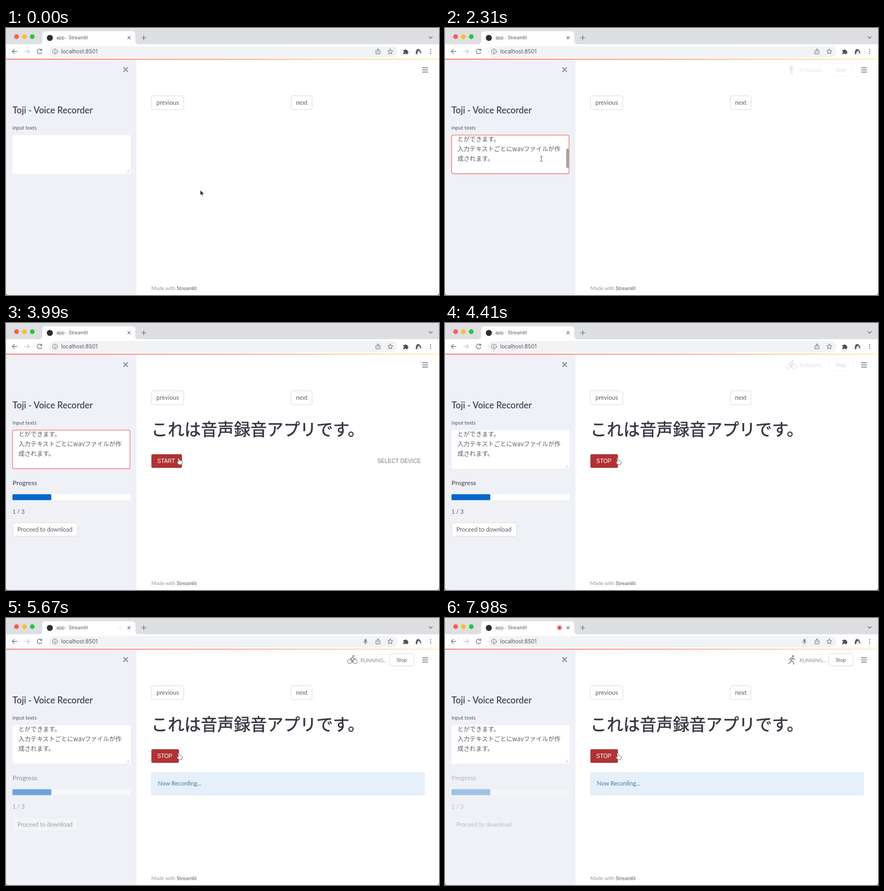
These frames come from a looping animation (800x494 px, 8000 ms). An HTML page:

```html
<!DOCTYPE html>
<html lang="ja">
<head>
<meta charset="utf-8">
<title>Voice Recorder</title>
<style>
  html, body { margin: 0; width: 100%; height: 100%; overflow: hidden; background: #fff; }
  svg { display: block; width: 800px; height: 494px; }
  text { font-family: Lato, "Noto Sans", sans-serif; fill: #31333f; fill-opacity: .8; white-space: pre; }
  .ui { font-family: Inter, Roboto, sans-serif; }
  .jp { font-family: "Noto Sans CJK JP", "Noto Sans CJK", sans-serif; }
  .mui { font-family: "Liberation Sans", Arial, sans-serif; font-size: 10.25px; }
  .btn { font-size: 11.1px; }
  .small { font-size: 9.5px; }
  .box { fill: #fff; stroke: #dcdde0; }
  .line { fill: none; stroke: #6b6f74; stroke-width: 1.2; stroke-linecap: round; stroke-linejoin: round; }
  .figure { fill: none; stroke: #85878f; stroke-width: 1.6; stroke-linecap: round; stroke-linejoin: round; }
  .figure circle { fill: #85878f; stroke: none; }
  .figure .wheel { fill: none; stroke: #85878f; stroke-width: 1.2; }
</style>
</head>
<body>
<svg viewBox="0 0 800 494">
  <defs>
    <linearGradient id="rainbow">
      <stop offset="0" stop-color="#f6716d"/>
      <stop offset=".5" stop-color="#fa9580"/>
      <stop offset="1" stop-color="#fdf0a8"/>
    </linearGradient>
    <clipPath id="areaClip"><rect x="12" y="199" width="218" height="70"/></clipPath>
  </defs>

  <!-- browser chrome -->
  <rect width="800" height="494" fill="#fff"/>
  <rect width="800" height="30" fill="#dddfe2"/>
  <path d="M61 30Q67 30 67 24V12Q67 6 73 6H233Q239 6 239 12V24Q239 30 245 30Z" fill="#fff"/>
  <circle cx="19.5" cy="16" r="4.4" fill="#fc5b57"/>
  <circle cx="34" cy="16" r="4.4" fill="#fdbb2e"/>
  <circle cx="48.5" cy="16" r="4.4" fill="#2ac440"/>
  <circle cx="81" cy="18.3" r="5.6" fill="#2d2e33"/>
  <text class="ui" x="93" y="21.3" font-size="8.6">app · Streamlit</text>
  <g id="rec">
    <circle cx="211.5" cy="18" r="2.5" fill="#e0262a"/>
    <circle cx="211.5" cy="18" r="4" fill="none" stroke="#e0262a" stroke-width=".9"/>
  </g>
  <path class="line" d="M225 15.7l4.6 4.6m0-4.6l-4.6 4.6M254.5 14v8m-4-4h8M781.5 16l3 3 3-3"/>
  <path class="line" d="M20.5 43.3h-9m4-4l-4 4 4 4"/>
  <path class="line" d="M34.5 43.3h9m-4-4l4 4-4 4" stroke-opacity=".4"/>
  <path class="line" d="M65.8 41.3A4.3 4.3 0 1 0 66 45M66 38.8v2.8h-2.8"/>
  <rect x="79" y="33.5" width="644" height="20.5" rx="10.2" fill="#f1f3f4"/>
  <circle class="line" cx="90.5" cy="43.5" r="4.5" style="stroke-width:1"/>
  <path class="line" d="M90.5 43v2.7M90.5 41v.1"/>
  <text class="ui" x="102" y="46.9" font-size="9.9">localhost:8501</text>
  <g id="mic">
    <rect x="662.6" y="39" width="3" height="5.5" rx="1.5" fill="#5f6368"/>
    <path class="line" d="M660.8 43.3a3.3 3.3 0 0 0 6.6 0M664.1 46.6v1.6" style="stroke-width:.9"/>
  </g>
  <path class="line" d="M685 42h-1.5v5.8h7.5v-5.8h-1.5M687.25 45v-6.3m-1.9 1.8l1.9-1.9 1.9 1.9" style="stroke-width:1"/>
  <path class="line" d="M710 38.7l1.4 3.2 3.4.3-2.6 2.3.8 3.4-3-1.8-3 1.8.8-3.4-2.6-2.3 3.4-.3z" style="stroke-width:1"/>
  <path d="M734 41h2.5a1.6 1.6 0 1 1 3.2 0h2.3v2.3a1.6 1.6 0 1 1 0 3.2v2h-2.5a1.5 1.5 0 1 0-3 0H734v-2.5a1.5 1.5 0 1 0 0-3z" fill="#4b4e52"/>
  <circle cx="762" cy="43.5" r="6" fill="#f0f0f1"/>
  <path d="M757 48.5Q757 39 761.5 39Q766 39 767.5 47.5Q765.5 47 763.5 42Q760 42 759.5 48.5Z" fill="#55575b"/>
  <g fill="#5f6368"><circle cx="784.5" cy="39.7" r="1"/><circle cx="784.5" cy="43.4" r="1"/><circle cx="784.5" cy="47.1" r="1"/></g>

  <!-- sidebar -->
  <rect y="58" width="241" height="436" fill="#eff1f6"/>
  <rect y="56.8" width="800" height="1.7" fill="url(#rainbow)"/>
  <path class="line" d="M217.5 73.5l7 7m0-7l-7 7" style="stroke:#85878f;stroke-width:1.9"/>
  <text x="12" y="157.6" font-size="16.4" font-weight="600" style="fill-opacity:.9">Toji - Voice Recorder</text>
  <text class="small" x="12" y="187.5">input texts</text>
  <rect id="area" x="12.2" y="198.2" height="71.3" rx="3" fill="#fff" stroke-width="1.3"/>
  <g id="typed" clip-path="url(#areaClip)" font-size="11.3">
    <text class="jp" x="23" y="210.2">とができます。</text>
    <text class="jp" x="23" y="228.3">入力テキストごとにwavファイルが作</text>
    <text class="jp" x="23" y="246.4">成されます。</text>
  </g>
  <path id="grip" d="M223 267.5l4.5-4.5m-2 4.5l2-2" fill="none" stroke="#aaa" stroke-width=".8"/>
  <rect id="bar" x="224" y="223" width="4.8" height="36" rx="2.2" fill="#a3a3a5"/>
  <g id="progress">
    <text x="12" y="300.3" font-size="12" font-weight="600">Progress</text>
    <rect x="12" y="316.8" width="218" height="11" rx="1.5" fill="#fff"/>
    <rect id="fill" x="12" y="316.8" height="11" rx="1.5" fill="#0468c8"/>
    <text x="12" y="352.7" font-size="10.5">1 / 3</text>
    <rect id="proceed" class="box" x="12.5" y="369.5" width="119.5" height="25" rx="3"/>
    <text x="21" y="385.8" font-size="10.9">Proceed to download</text>
  </g>

  <!-- main page -->
  <path class="line" d="M769.5 73.5h9.5m-9.5 4h9.5m-9.5 4h9.5" style="stroke:#777981;stroke-width:1.5"/>
  <rect class="box" x="268.5" y="125.5" width="60" height="25.5" rx="3"/>
  <text class="btn" x="278" y="142.3">previous</text>
  <rect class="box" x="527" y="125.5" width="38.5" height="25.5" rx="3"/>
  <text class="btn" x="535.8" y="142.3">next</text>
  <text id="title" class="jp" x="268.5" y="208.3" font-size="30.5" font-weight="500" stroke="#31333f" stroke-width=".5" style="fill-opacity:1">これは音声録音アプリです。</text>
  <g id="control">
    <rect id="face" x="268.6" y="242.7" height="25.4" rx="2.5"/>
    <text id="label" class="mui" x="279.6" y="259.2" style="fill:#fff;fill-opacity:1"></text>
  </g>
  <text id="device" class="mui" x="686" y="259.2" style="fill-opacity:.65">SELECT DEVICE</text>
  <g id="info">
    <rect x="268.5" y="285.5" width="504.7" height="42.3" rx="3" fill="#e5f0fb" stroke="#deeaf7"/>
    <text x="280.6" y="310.4" font-size="10.8" style="fill:#2f5a75">Now Recording...</text>
  </g>
  <text class="small" x="268.5" y="485" style="fill-opacity:.5">Made with <tspan fill-opacity=".8">Streamlit</tspan></text>

  <g id="status">
    <g class="figure" id="run">
      <circle cx="643" cy="70.7" r="1.9"/>
      <path d="M642 73.8l-2.5 5 3.8 2.4 1 4.3M639.5 78.8l-1.200 2.800-3.300 2.900M642 73.800l-4.200.9-1.300 2.800M642 73.800l2.400 2.900 2.400.3"/>
    </g>
    <g class="figure" id="bike">
      <circle class="wheel" cx="635" cy="80.5" r="3.8"/><circle class="wheel" cx="645" cy="80.5" r="3.8"/>
      <circle cx="642" cy="70.3" r="1.7"/>
      <path d="M640 72.7l-3.5 3.3 3.5 2v4M640 72.7l2.3 2.8h3"/>
    </g>
    <g class="figure" id="gym">
      <circle cx="640" cy="71.5" r="1.9"/>
      <path d="M634.5 71.5l3.5 3.5h4l3.5-3.5M638.5 75.5v8.5M641.5 75.5v8.5M640 75v4"/>
    </g>
    <text x="655" y="82.4" font-size="9.1" style="fill-opacity:.55">RUNNING...</text>
    <rect class="box" x="709" y="66" width="45" height="22.5" rx="3"/>
    <text x="721.7" y="80.6" font-size="9.4">Stop</text>
  </g>

  <path d="M0 490V494H4Q0 494 0 490ZM800 490V494H796Q800 494 800 490Z" fill="#666"/>

  <!-- pointers, each drawn around its own hot spot -->
  <path id="arrow" d="M0 0V9.5L2.2 7.5 3.8 11 5.3 10.3 3.8 7H6.8Z" fill="#222" stroke="#fff" stroke-width=".6"/>
  <path id="beam" d="M-2.2-5Q0-5 0-3.8Q0-5 2.2-5M0-3.8V3.8M-2.2 5Q0 5 0 3.8Q0 5 2.2 5" fill="none" stroke="#555" stroke-width="1"/>
  <path id="hand" d="M-2.5-5.2Q-1.2-6.6-.3-5L.6-1.8Q2-2.5 2.8-1.2Q4.2-1.5 4.5-.4Q5.7-.2 5.6 1.4Q5.6 4.200 4.200 6H-1Q-2.800 3.600-4.400 1.600Q-3.800 0-1.600 1.300Z" fill="#fff" stroke="#555" stroke-width=".8" stroke-linejoin="round"/>
</svg>
<script>
const LOOP = 8000;
const $ = id => document.getElementById(id);
const set = (id, name, value) => $(id).setAttribute(name, value);
const show = (id, on) => set(id, "visibility", on ? "inherit" : "hidden");
const fade = (id, value) => set(id, "opacity", value);
const ramp = (t, a, b) => Math.min(1, Math.max(0, (t - a) / (b - a)));
const ease = p => p * p * (3 - 2 * p);
const mix = (a, b, p) => a + (b - a) * p;

const poses = ["run", "gym", "bike", "run", "bike", "gym", "bike"];

function pointer(t) {
  const toArea = ease(ramp(t, 490, 1260));
  const toButton = ease(ramp(t, 3430, 3850));
  return {
    x: mix(mix(359, 178, toArea), 320, toButton),
    y: mix(mix(300, 242, toArea), 256, toButton)
  };
}

// Two flashes, then steady: quick rise, slow fall
function recordLevel(t) {
  const s = t - 4500;
  if (s < 0) return 0;
  if (s >= 2400) return ramp(s, 2400, 2600) ** 2;
  const u = s % 1200;
  return u < 200 ? (u / 200) ** 2 : 1 - ((u - 200) / 1000) ** 2;
}

function draw(t) {
  const p = pointer(t);
  const inArea = p.x > 12 && p.x < 230 && p.y > 198 && p.y < 270;
  const loaded = t >= 2520;
  const ready = t >= 2660;
  const recording = t >= 4340;
  const onButton = ready && p.x > 269 && t > 3430;

  for (const [id, on] of [["beam", inArea], ["hand", onButton], ["arrow", !inArea && !onButton]]) {
    show(id, on);
    set(id, "transform", `translate(${p.x} ${p.y})`);
  }

  const focused = t >= 1330 && t < 4200;
  const typed = t >= 1610;
  set("area", "stroke", focused ? "#f77b7b" : "none");
  set("area", "width", focused ? 217 : 218);
  show("typed", typed);
  show("bar", typed && inArea);
  show("grip", !focused);

  show("title", loaded);
  show("progress", loaded);
  set("fill", "width", 71.7 * ease(ramp(t, 2480, 2800)));
  const stale = ramp(t, 4850, 5850) ** 2;
  fade("progress", 1 - .66 * stale);
  fade("proceed", 1 - .9 * stale);

  show("control", ready);
  $("label").textContent = recording ? "STOP" : "START";
  set("face", "width", recording ? 51 : 56.5);
  set("face", "fill", onButton ? "#b13234" : "#ff4b4b");
  show("device", ready && !recording);
  show("info", t >= 4550);

  show("mic", t >= 4500);
  fade("rec", recordLevel(t));

  const first = ramp(t, 2240, 2590) * (1 - ramp(t, 2660, 2870));
  fade("status", Math.max(first, ramp(t, 4340, 4620)));
  const pose = poses[Math.floor((t + 70) / 190) % poses.length];
  for (const id of ["run", "bike", "gym"]) show(id, id === pose);
}

const start = performance.now();
function tick() {
  draw((performance.now() - start) % LOOP);
  requestAnimationFrame(tick);
}
draw(0);
requestAnimationFrame(tick);
</script>
</body>
</html>
```
